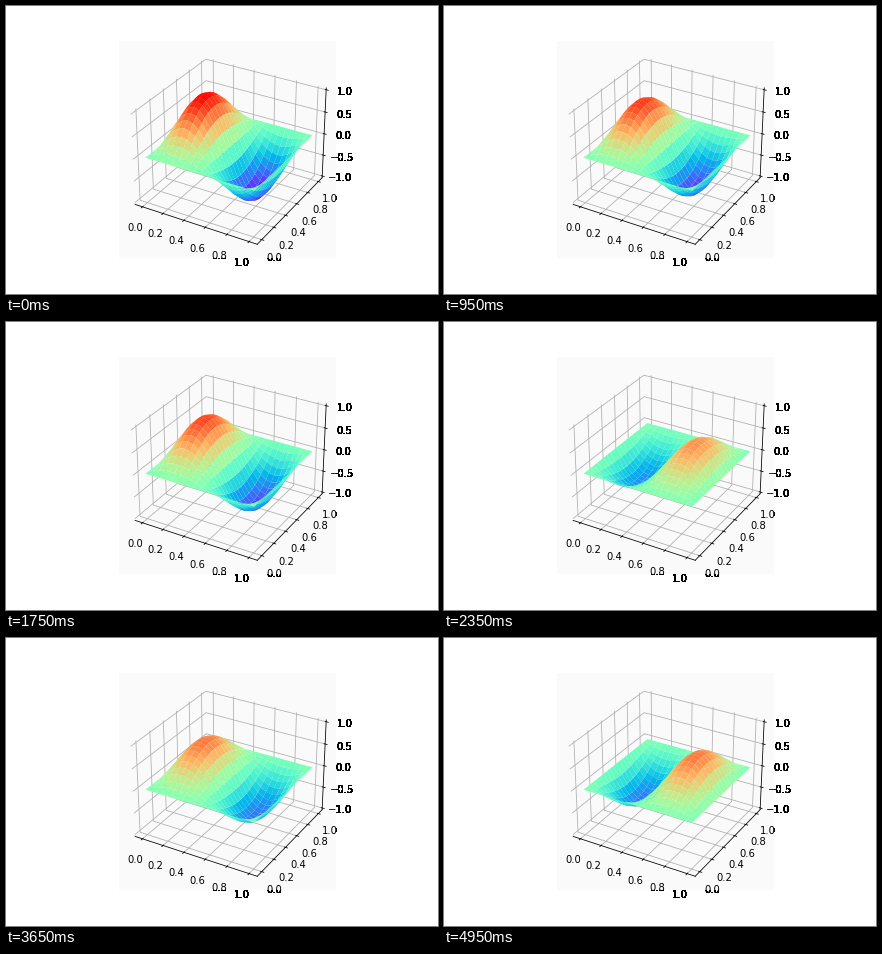
Write a matplotlib script that moves like this. It is 432 px wide and 288 px high and loops after 5 s.

```python
import numpy as np
import matplotlib.pyplot as plt
from matplotlib.animation import FuncAnimation

FRAMES = 100
STEP_MS = 50
PERIOD = 17.95   # frames per oscillation
DECAY = 0.0035   # amplitude loss rate per frame
CELLS = 20
OVERPRINT = 25   # label passes that build up outside the axes

plt.rcParams.update({"font.family": "DejaVu Sans", "font.size": 10})
fig = plt.figure(figsize=(6, 4), dpi=72, facecolor="white")
fig.subplots_adjust(left=0.125, right=0.9, bottom=0.125, top=0.88)
ax = fig.add_subplot(projection="3d", facecolor="0.98")


def padded(low, high):
    """Widen a range by the gap left before the walls."""
    gap = (high - low) / 48
    return low - gap, high + gap


ax.set(xlim=padded(-0.05, 1.05), ylim=padded(-0.05, 1.05), zlim=padded(-1, 1))
ax.set_xticks(np.linspace(0, 1, 6))
ax.set_yticks(np.linspace(0, 1, 6))
ax.set_zticks(np.linspace(-1, 1, 5))
axes3 = ax.xaxis, ax.yaxis, ax.zaxis
for axis in axes3:
    axis.set_pane_color((0.98, 0.98, 0.98, 1))

grid = np.linspace(0, 1, CELLS + 1)
X, Y = np.meshgrid(grid, grid)
MODE = np.sin(2 * np.pi * X) * np.sin(np.pi * Y)
surface = None


def thicken(label):
    """Stack copies behind the axes of a tick label that sticks out."""
    box = label.get_window_extent()
    if box.x1 <= ax.bbox.x1 and box.y0 >= ax.bbox.y0:
        return
    x, y = fig.transFigure.inverted().transform(
        label.get_transform().transform(label.get_position()))
    for _ in range(OVERPRINT):
        fig.text(x, y, label.get_text(), ha=label.get_ha(),
                 va=label.get_va(), zorder=-1)


def update(i):
    global surface
    if surface is not None:
        surface.remove()
    height = np.exp(-DECAY * i) * np.cos(2 * np.pi * i / PERIOD)
    surface = ax.plot_surface(X, Y, height * MODE, cmap="rainbow",
                              vmin=-1, vmax=1, linewidth=0)
    return surface,


# Label positions are only known once the axes have been drawn.
fig.canvas.draw()
for axis in axes3:
    for tick in axis.majorTicks:
        thicken(tick.label1)

anim = FuncAnimation(fig, update, frames=FRAMES, interval=STEP_MS,
                     init_func=lambda: [], repeat=True, repeat_delay=0)
plt.show()
```
